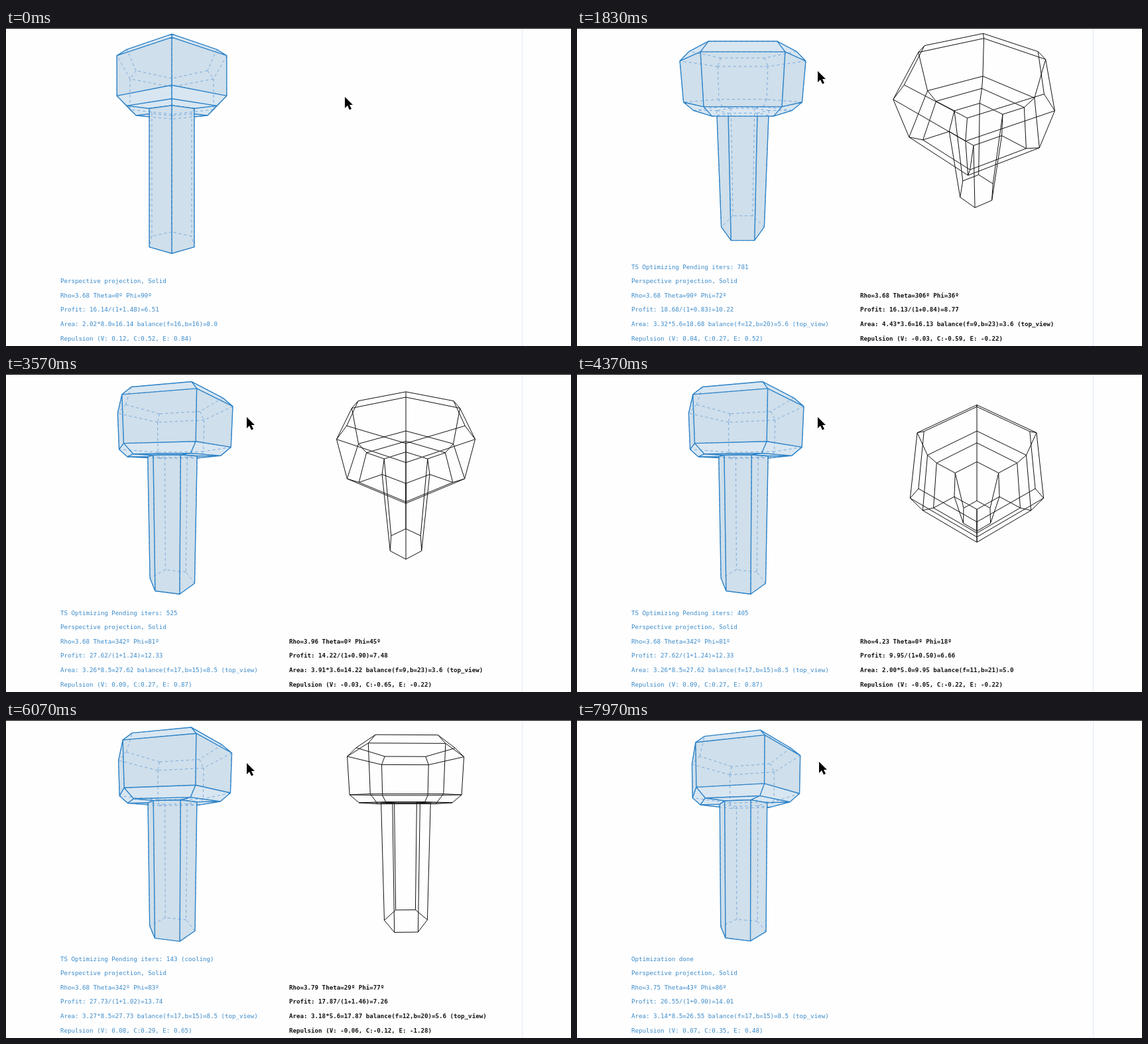
An HTML page with a canvas for the animation above (8 s loop, 852 by 480 pixels).

```html
<!DOCTYPE html>
<html lang="en">
<head>
<meta charset="utf-8">
<title>Best view search</title>
<style>
html, body { margin: 0; width: 100%; height: 100%; overflow: hidden; background: #fefefe; }
canvas { display: block; }
</style>
</head>
<body>
<canvas id="stage" width="852" height="480"></canvas>
<script>
const ctx = document.getElementById('stage').getContext('2d');
const LOOP = 8000, STEP = 100 / 3, COOLING = 165, DONE = 221;
const RAD = Math.PI / 180;

// The bolt: a chamfered hexagonal head on a shank, as rings from top to bottom.
const HEAD = 1, RIM = .84, SHANK = .445, UNDERSIDE = .768, CHAMFER = .138;
const rings = [
  { r: RIM, z: 1.68 },
  { r: HEAD, z: 1.68 - CHAMFER },
  { r: HEAD, z: UNDERSIDE + CHAMFER },
  { r: RIM, z: UNDERSIDE },
  { r: SHANK, z: UNDERSIDE },
  { r: SHANK, z: -1.61 }
];
const six = [...Array(6).keys()];
const faces = [
  { points: six.map(j => [0, 5 - j]), part: 'head' },
  { points: six.map(j => [5, j]), part: 'shank' }
];
const edges = [];
for (const i of six) {
  for (const j of six) {
    const next = (j + 1) % 6;
    edges.push([[i, j], [i, next]]);
    if (i === 5) continue;
    edges.push([[i, j], [i + 1, j]]);
    faces.push({
      points: [[i, j], [i, next], [i + 1, next], [i + 1, j]],
      part: i < 4 ? 'head' : 'shank',
      bevel: rings[i].r !== rings[i + 1].r
    });
  }
}

// Improvements of the best view.
const best = [
  { step: 0, theta: 0, phi: 90, rho: 3.68, area: 2.017, repulsion: [.119, .52, .839] },
  { step: 32, theta: 90, phi: 72, rho: 3.68, area: 3.321, repulsion: [.04, .269, .519] },
  { step: 77, theta: 342, phi: 81, rho: 3.68, area: 3.262, repulsion: [.092, .274, .874] },
  { step: 170, theta: 342, phi: 83, rho: 3.68, area: 3.2749, repulsion: [.08, .289, .649] },
  { step: DONE, theta: 43, phi: 86, rho: 3.75, area: 3.1358, repulsion: [.068, .348, .4795] }
];
// Waypoints of the search: step, theta, phi, rho.
const trail = [
  [1, 180, 81, 3.68], [55, 306, 36, 3.68], [83, 342, 63, 3.68], [131, 360, 18, 4.23],
  [154, 234, 9, 4.42], [182, 389, 77, 3.79], [DONE, 403, 86, 3.75]
];

const leftPane = { cx: 250, cy: 189, zoom: 304 };
const rightPane = { cx: 603, cy: 187.5, zoom: 303 };

function random(step, salt) {
  const x = Math.sin(step * 12.9898 + salt * 78.233) * 43758.5453;
  return x - Math.floor(x);
}

function hasTopView(phi) {
  return phi > 20 && phi < 90;
}

// Iterations per step grow slightly during the run.
function pendingIterations(step) {
  const d = step - 55;
  return Math.max(0, Math.ceil(781 - 4.857 * d - .00132 * d * d));
}

function score(phi) {
  const wave = Math.sin(2 * phi * RAD);
  return {
    area: hasTopView(phi) ? 3.17 + 2.95 * Math.cos(phi * RAD) ** 4 : Math.min(2.02, 1.6 + .0225 * phi),
    repulsion: [.05 * wave - .08, -.65 * wave * wave, -.22 - 1.06 * Math.min(1, (phi / 77) ** 12)]
  };
}

// Candidate under test: a quantised random move around the search path.
function candidate(step) {
  const n = Math.max(1, trail.findIndex(([s]) => s >= step));
  const a = trail[n - 1], b = trail[n];
  const u = (step - a[0]) / (b[0] - a[0]);
  let [, theta, phi, rho] = a.map((v, c) => v + (b[c] - v) * u);
  if (u > 0 && u < 1) {
    const grid = step < COOLING ? 9 : 1;
    const move = (v, reach, salt) =>
      grid * Math.round(v / grid + (random(step, salt) * 2 - 1) * reach);
    theta = move(theta, 2, 1);
    phi = Math.min(90, Math.max(9, move(phi, 1, 2)));
  }
  return { theta, phi, rho, ...score(phi) };
}

function project(view, pane) {
  const sin = Math.sin(view.phi * RAD), cos = Math.cos(view.phi * RAD);
  return rings.map(({ r, z }) => six.map(j => {
    const angle = (j * 60 - view.theta) * RAD;
    const x = r * Math.cos(angle), y = r * Math.sin(angle);
    const k = pane.zoom / (view.rho - x * sin - z * cos);
    return [pane.cx + y * k, pane.cy - (z * sin - x * cos) * k];
  }));
}

function frontFaces(grid) {
  return faces.filter(({ points }) => {
    let area = 0;
    points.forEach(([i, j], n) => {
      const [m, l] = points[(n + 1) % points.length];
      const p = grid[i][j], q = grid[m][l];
      area += p[0] * q[1] - q[0] * p[1];
    });
    // The side chamfers are almost edge-on in a level view.
    return area > .01 && area / points.length > 1e-3;
  });
}

function trace(points, grid) {
  points.forEach(([i, j], n) => ctx[n ? 'lineTo' : 'moveTo'](...grid[i][j]));
}

function strokeEdges(grid) {
  ctx.beginPath();
  edges.forEach(edge => trace(edge, grid));
  ctx.stroke();
}

function outline(list, grid) {
  ctx.beginPath();
  for (const { points } of list) {
    trace(points, grid);
    ctx.closePath();
  }
}

function drawSolid(view, grid, front) {
  const above = view.rho * Math.cos(view.phi * RAD) > UNDERSIDE;
  const near = front.filter(f => (f.part === 'head') === above);
  const far = front.filter(f => !near.includes(f));
  for (const face of [...far, ...near]) {
    outline([face], grid);
    ctx.fillStyle = face.bevel ? '#d8e6f1' : '#cfdfeb';
    ctx.fill();
  }
  ctx.lineWidth = 1;
  ctx.strokeStyle = '#78a9dc';
  ctx.setLineDash([4, 4]);
  strokeEdges(grid);
  ctx.setLineDash([]);

  // The far part is solid only outside the near one.
  ctx.lineWidth = 1.4;
  ctx.strokeStyle = '#2f84c8';
  ctx.save();
  outline(near, grid);
  ctx.rect(0, 0, 852, 480);
  ctx.clip('evenodd');
  outline(far, grid);
  ctx.stroke();
  ctx.restore();
  outline(near, grid);
  ctx.stroke();
}

function write(text, x, line) {
  ctx.fillText(text, x, 363.5 + line * 21.6);
}

function writeStats(view, f, x) {
  const fix = v => v.toFixed(2);
  const b = faces.length - f;
  const balance = f * f * b / 512;
  const total = view.area * balance;
  const [V, C, E] = view.repulsion;
  const sum = Math.abs(V) + Math.abs(C) + Math.abs(E);
  const top = hasTopView(view.phi) ? ' (top_view)' : '';
  write(`Rho=${fix(view.rho)} Theta=${(view.theta + 360) % 360}º Phi=${view.phi}º`, x, 2);
  write(`Profit: ${fix(total)}/(1+${fix(sum)})=${fix(total / (1 + sum))}`, x, 3);
  write(`Area: ${fix(view.area)}*${balance.toFixed(1)}=${fix(total)} ` +
        `balance(f=${f},b=${b})=${balance.toFixed(1)}${top}`, x, 4);
  write(`Repulsion (V: ${fix(V)}, C:${fix(C)}, E: ${fix(E)})`, x, 5);
}

function drawCursor(t) {
  const u = Math.min(1, Math.max(0, (t - 100) / 700));
  const ease = u * u * (3 - 2 * u);
  const [x, y] = t >= 7970 ? [365, 63] : [511 - 148 * ease, 104 - 39 * ease];
  ctx.save();
  ctx.translate(x, y);
  ctx.fillStyle = '#000';
  ctx.fill(new Path2D('M0 0V17L4 13L7 19.5L10 18L7 12H12Z'));
  ctx.restore();
}

function draw(t) {
  const step = Math.floor((t + 3.5) / STEP);
  ctx.fillStyle = '#fefefe';
  ctx.fillRect(0, 0, 852, 480);
  ctx.fillStyle = '#e2e8f8';
  ctx.fillRect(778, 0, 1, 480);
  ctx.fillStyle = '#000';
  ctx.fillRect(0, 0, 852, 1);
  ctx.font = '9.17px "DejaVu Sans Mono", monospace';
  ctx.lineJoin = 'round';

  const view = best.filter(v => v.step <= step).pop();
  const grid = project(view, leftPane);
  const front = frontFaces(grid);
  drawSolid(view, grid, front);
  ctx.fillStyle = '#3a8aca';
  write('Perspective projection, Solid', 82, 1);
  writeStats(view, front.length, 82);

  if (step >= DONE) {
    write('Optimization done', 82, 0);
  } else if (step > 0) {
    const cooling = step >= COOLING ? ' (cooling)' : '';
    write(`TS Optimizing Pending iters: ${pendingIterations(step)}${cooling}`, 82, 0);
    const trial = candidate(step);
    trial.rho += 0;
    const wire = project(trial, rightPane);
    ctx.lineWidth = 1;
    ctx.strokeStyle = ctx.fillStyle = '#111';
    strokeEdges(wire);
    ctx.font = 'bold ' + ctx.font;
    writeStats(trial, frontFaces(wire).length, 427);
  }
  drawCursor(t);
}

function tick() {
  draw(performance.now() % LOOP);
  requestAnimationFrame(tick);
}
tick();
</script>
</body>
</html>
```
